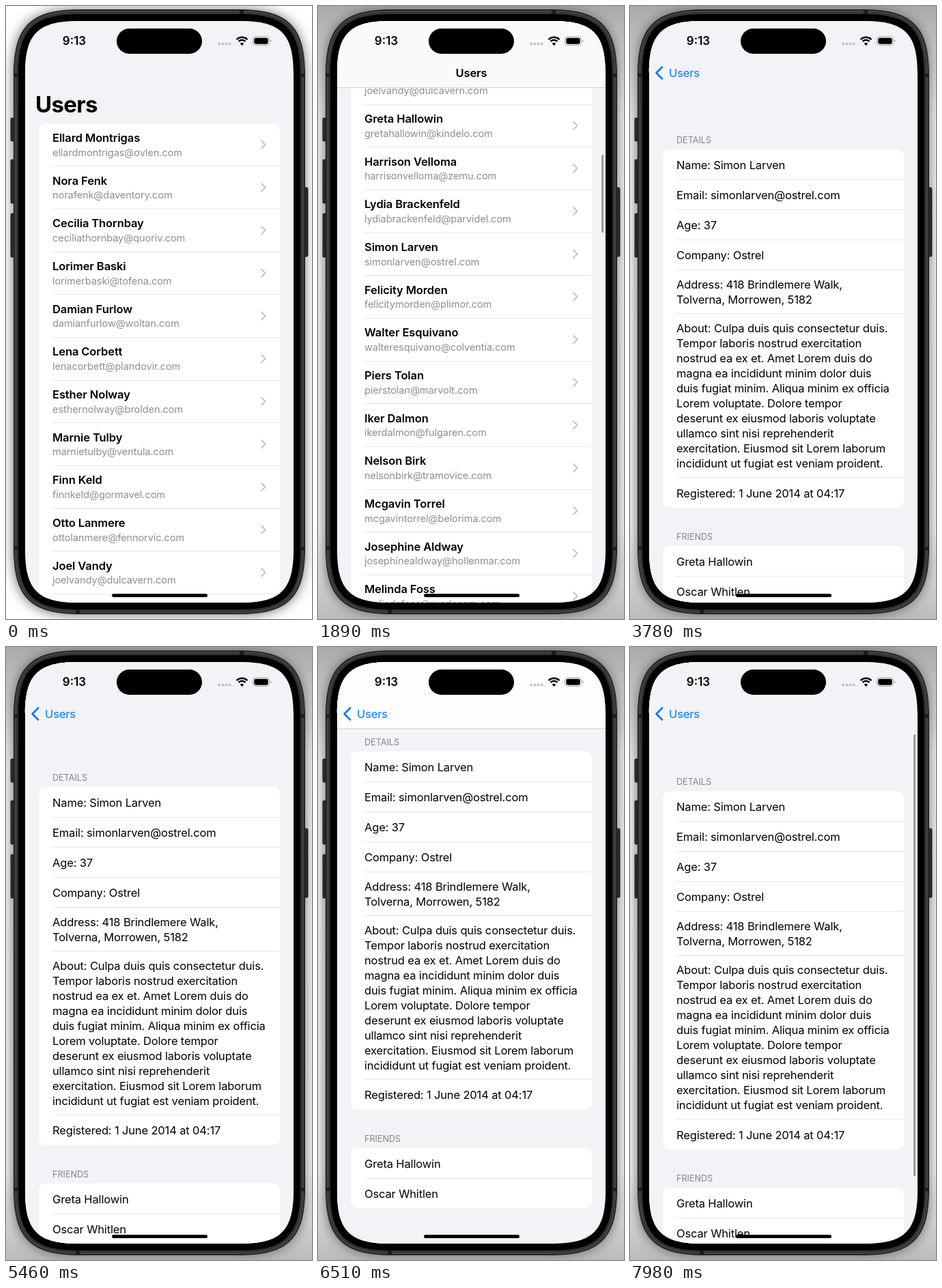
These frames come from a looping animation (448 px wide and 898 px high, 8 s). An HTML page:

```html
<!DOCTYPE html>
<html lang="en">
<head>
<meta charset="utf-8">
<title>Users</title>
<style>
  html, body { margin: 0; width: 100%; height: 100%; overflow: hidden; background: #fff; }
  svg { display: block; width: 100vw; height: 100vh; }
  text { font-family: Inter, Roboto, "Liberation Sans", sans-serif; font-optical-sizing: none; fill: #000; white-space: pre; }
  .body { font-size: 16.5px; letter-spacing: -.15px; }
  .bold { font-size: 16.5px; font-weight: 600; letter-spacing: -.1px; }
  .clock { font-size: 17px; font-weight: 600; }
  .mail { font-size: 14.55px; letter-spacing: -.08px; fill: #8e8e92; }
  .head { font-size: 12.6px; fill: #85858a; }
  .large { font-size: 33px; font-weight: 700; letter-spacing: -.7px; }
  .sep { fill: #e6e6e8; shape-rendering: crispEdges; }
  .card { fill: #fff; }
  .thumb { fill: #9a9a9d; }
</style>
</head>
<body>
<svg id="stage" viewBox="0 0 448 898"></svg>
<script>
const LOOP = 8000, STEP = 70, ROW = 188 / 3, LIST_TOP = 172, WIDTH = 393, TAPPED = 14;

const users = [
  ['Ellard Montrigas', 'ovlen'], ['Nora Fenk', 'daventory'], ['Cecilia Thornbay', 'quoriv'],
  ['Lorimer Baski', 'tofena'], ['Damian Furlow', 'woltan'], ['Lena Corbett', 'plandovir'],
  ['Esther Nolway', 'brolden'], ['Marnie Tulby', 'ventula'], ['Finn Keld', 'gormavel'],
  ['Otto Lanmere', 'fennorvic'], ['Joel Vandy', 'dulcavern'], ['Greta Hallowin', 'kindelo'],
  ['Harrison Velloma', 'zemu'], ['Lydia Brackenfeld', 'parvidel'], ['Simon Larven', 'ostrel'],
  ['Felicity Morden', 'plimor'], ['Walter Esquivano', 'colventia'], ['Piers Tolan', 'marvolt'],
  ['Iker Dalmon', 'fulgaren'], ['Nelson Birk', 'tramovice'], ['Mcgavin Torrel', 'belorima'],
  ['Josephine Aldway', 'hollenmar'], ['Melinda Foss', 'rundocam'], ['Ivo Santer', 'quellario']
];
const about = [
  'About: Culpa duis quis consectetur duis.', 'Tempor laboris nostrud exercitation',
  'nostrud ea ex et. Amet Lorem duis do', 'magna ea incididunt minim dolor duis',
  'duis fugiat minim. Aliqua minim ex officia', 'Lorem voluptate. Dolore tempor',
  'deserunt ex eiusmod laboris voluptate', 'ullamco sint nisi reprehenderit',
  'exercitation. Eiusmod sit Lorem laborum', 'incididunt ut fugiat est veniam proident.'
];

const mailOf = ([name, host]) => `${name.toLowerCase().replace(' ', '')}@${host}.com`;
const text = (cls, x, y, s, extra = '') => `<text class="${cls}" x="${x}" y="${y}" ${extra}>${s}</text>`;
const rect = (x, y, w, h, r, extra) => `<rect x="${x}" y="${y}" width="${w}" height="${h}" rx="${r}" ${extra}/>`;
const sep = y => rect(68, y - .5, 333, 1, 0, 'class="sep"');
const card = (y, h) => rect(48, y, 353, h, 10, 'class="card"');
const lines = (y, list) => list.map((s, i) => text('body', 68, y + 22 * i, s)).join('');
const thumb = id => rect(415, 128, 3, 100, 1.5, `id="${id}" class="thumb"`);
const bar = (id, color) => `<g id="${id}">${rect(28, 22, WIDTH, 97.5, 0, `fill="${color}"`)}
  ${rect(28, 119, WIDTH, 1, 0, 'fill="#d4d4d7"')}</g>`;

// Rectangle whose corners ease into the straight sides.
function squircle(x, y, w, h, r, extra = '') {
  const e = 1.35 * r, c = e * .755, d = e - c;
  return `<path d="M${x} ${y + e}c0 ${-c} ${d} ${-e} ${e} ${-e}h${w - 2 * e}c${c} 0 ${e} ${d} ${e} ${e}
    v${h - 2 * e}c0 ${c} ${-d} ${e} ${-e} ${e}h${2 * e - w}c${-c} 0 ${-e} ${-d} ${-e} ${-e}z" ${extra}/>`;
}

function userRow(user, i) {
  const y = LIST_TOP + i * ROW;
  const glow = i === TAPPED ? rect(48, y, 353, ROW, 0, 'id="glow" fill="#d1d1d6"') : '';
  return glow + text('bold', 68, y + 27, user[0]) + text('mail', 68, y + 47.7, mailOf(user))
    + `<path d="M374 ${y + 25.6}l5.6 5.6l-5.6 5.6" fill="none" stroke="#c4c4c7" stroke-width="2" stroke-linecap="round" stroke-linejoin="round"/>`
    + sep(y + ROW);
}

function listPage() {
  return `<g id="listPage">${rect(28, 22, WIDTH, 852, 0, 'fill="#f2f2f7"')}
    <g id="list">${text('large', 43, 156, 'Users')}${card(LIST_TOP, ROW * users.length)}
    ${users.map(userRow).join('')}</g>
    ${bar('listBar', '#fafafa')}${thumb('listThumb')}
    ${rect(28, 22, WIDTH, 852, 0, 'id="dim"')}</g>`;
}

function detailPage() {
  const [name, host] = users[TAPPED];
  const company = host[0].toUpperCase() + host.slice(1);
  const fields = [`Name: ${name}`, `Email: ${mailOf(users[TAPPED])}`, 'Age: 37', `Company: ${company}`];
  return `<g id="detailPage">${rect(28, 22, WIDTH, 852, 0, 'fill="#f2f2f7"')}
    <g id="detail">${text('head', 68, 201, 'DETAILS')}${card(210, 525)}
    ${fields.map((s, i) => text('body', 68, 239 + 44 * i, s) + sep(254.5 + 44 * i)).join('')}
    ${lines(414, ['Address: 418 Brindlemere Walk,', 'Tolverna, Morrowen, 5182'])}${sep(450.5)}
    ${lines(478, about)}${sep(690.5)}
    ${text('body', 68, 719.5, 'Registered: 1 June 2014 at 04:17')}
    ${text('head', 68, 782, 'FRIENDS')}${card(791, 88)}
    ${text('body', 68, 820, users[11][0])}${sep(835.5)}${text('body', 68, 864, 'Oscar Whitlen')}</g>
    ${bar('detailBar', '#fdfdfd')}${thumb('detailThumb')}</g>`;
}

function phone() {
  const side = (x, y, h) => rect(x, y, 6, h, 1.5, 'fill="#2b2b2b" stroke="#111" stroke-width=".8"');
  const mark = (x, y, w, h) => rect(x, y, w, h, 0, 'fill="#1c1c1c"');
  return squircle(11, 6, 426, 885, 72, 'fill="#666" filter="url(#blur)"')
    + side(7, 164, 34) + side(7, 225, 64) + side(7, 304, 64) + side(436, 266, 101)
    + squircle(11.5, 5.5, 426, 885, 72, 'fill="#333" stroke="#1a1a1a"')
    + squircle(14, 8, 421, 880, 70, 'fill="none" stroke="#505050"')
    + mark(11, 99, 6, 5) + mark(432, 99, 6, 5) + mark(11, 792, 6, 5) + mark(432, 792, 6, 5)
    + mark(342, 6, 6, 6) + mark(102, 884, 6, 6)
    + squircle(18, 12, 413, 872, 66, 'fill="#000"');
}

function statusBar() {
  const arc = r => {
    const d = r * .72;
    return `<path d="M${345.5 - d} ${57 - d}A${r} ${r} 0 0 1 ${345.5 + d} ${57 - d}" fill="none" stroke="#000" stroke-width="2.5"/>`;
  };
  const dots = [312, 317.2, 322.4, 327.6].map(x => `<circle cx="${x}" cy="55.5" r="2" fill="#c3c3c7"/>`).join('');
  return text('clock', 100, 57, '9:13', 'text-anchor="middle"')
    + rect(162, 33, 125, 37, 18.5, '') + dots + arc(11) + arc(7)
    + '<path d="M345.5 58l-2.8-3a4 4 0 0 1 5.6 0z"/>'
    + rect(361.5, 45, 24, 12.5, 4, 'fill="none" stroke="#a3a3a7"')
    + rect(363.3, 46.8, 20.4, 8.9, 2.4, '')
    + '<path d="M387 49.2v4.2a2.3 2.3 0 0 0 0-4.2z" fill="#a3a3a7"/>';
}

const stage = document.getElementById('stage');
stage.innerHTML = `<defs>
    <filter id="blur" x="-20%" y="-10%" width="140%" height="120%"><feGaussianBlur stdDeviation="9"/></filter>
    <linearGradient id="haze" x2="0" y2="1">
      <stop offset="0" stop-color="#aaa"/><stop offset=".18" stop-color="#eee"/>
      <stop offset=".85" stop-color="#f2f2f2"/><stop offset="1" stop-color="#bbb"/>
    </linearGradient>
    <clipPath id="screen">${squircle(28, 22, WIDTH, 852, 57)}</clipPath>
  </defs>
  ${rect(0, 0, 448, 898, 0, 'fill="#fff"')}
  ${rect(0, 0, 448, 898, 0, 'id="backdrop" fill="url(#haze)"')}${phone()}
  <g clip-path="url(#screen)">${listPage()}${detailPage()}
    ${text('bold', 224.5, 104, 'Users', 'id="title" text-anchor="middle"')}
    <g id="back">
      <path d="M47 89.5L38.5 98L47 106.5" fill="none" stroke="#007aff" stroke-width="2.6" stroke-linecap="round" stroke-linejoin="round"/>
      ${text('body', 57, 104, 'Users', 'id="backLabel" style="fill:#007aff"')}
    </g>
    ${statusBar()}${rect(155, 861, 140, 5, 2.5, '')}
  </g>`;

const el = {};
stage.querySelectorAll('[id]').forEach(node => el[node.id] = node);

const clamp = v => Math.min(1, Math.max(0, v));
const move = (node, x, y) => node.setAttribute('transform', `translate(${x} ${y})`);
const fade = (node, a) => node.setAttribute('opacity', a);
function setThumb(node, y, h) {
  node.setAttribute('y', y);
  node.setAttribute('height', h);
}

// Smooth curve through [time, value] points without overshoot.
function curve(points) {
  const n = points.length - 1;
  const grad = i => (points[i + 1][1] - points[i][1]) / (points[i + 1][0] - points[i][0]);
  const slope = points.map((_, i) => {
    if (i === 0 || i === n) return 0;
    const a = grad(i - 1), b = grad(i);
    return a * b <= 0 ? 0 : 2 * a * b / (a + b);
  });
  return t => {
    if (t <= points[0][0]) return points[0][1];
    if (t >= points[n][0]) return points[n][1];
    const i = points.findIndex(p => t < p[0]) - 1;
    const [t0, a] = points[i], [t1, b] = points[i + 1];
    const d = t1 - t0, u = (t - t0) / d, s = u * u * (3 - 2 * u);
    return a + (b - a) * s + d * u * (1 - u) * ((1 - u) * slope[i] - u * slope[i + 1]);
  };
}

const listScroll = curve([[490, 0], [1190, 324.3], [1890, 717.3]]);
const detailScroll = curve([
  [5390, 0], [5880, 94], [6020, 88], [6300, 64], [6580, 56.7],
  [7140, 56.7], [7350, 0], [7560, -40], [7770, -13], [7980, -1.3]
]);

function push(t) {
  if (t >= 3780) return 1;
  const x = Math.max(0, t - 3150) * .014;
  return 1 - (1 + x) * Math.exp(-x);
}

function draw(time) {
  const t = Math.floor(time / STEP) * STEP;
  const a = listScroll(t), b = detailScroll(t), p = push(t);
  const barOn = o => clamp((o - 42) / 10);

  fade(el.backdrop, t >= 350 ? 1 : 0);
  move(el.listPage, -p * WIDTH * .3, 0);
  move(el.list, 0, -a);
  fade(el.listBar, barOn(a));
  fade(el.listThumb, t >= 560 ? 1 : 0);
  setThumb(el.listThumb, 166 + (a - 324.3) * .132, 116 - Math.max(0, a - 324) * .005);
  fade(el.glow, t >= 3150 ? 1 : 0);
  fade(el.dim, p * .1);

  move(el.detailPage, (1 - p) * WIDTH, 0);
  move(el.detail, 0, -b);
  fade(el.detailBar, barOn(b));
  fade(el.detailThumb, t >= 7210 ? 1 : 0);
  setThumb(el.detailThumb, 128 + Math.max(0, b) * .82, 649 + Math.min(0, b) * 1.4);

  move(el.title, -p * 145, 0);
  fade(el.title, barOn(a) * clamp(1 - p * 1.6));
  move(el.backLabel, (1 - p) * 145, 0);
  fade(el.back, clamp(p * 1.6 - .6));
}

function tick(now) {
  draw(now % LOOP);
  requestAnimationFrame(tick);
}
draw(0);
requestAnimationFrame(tick);
</script>
</body>
</html>
```
